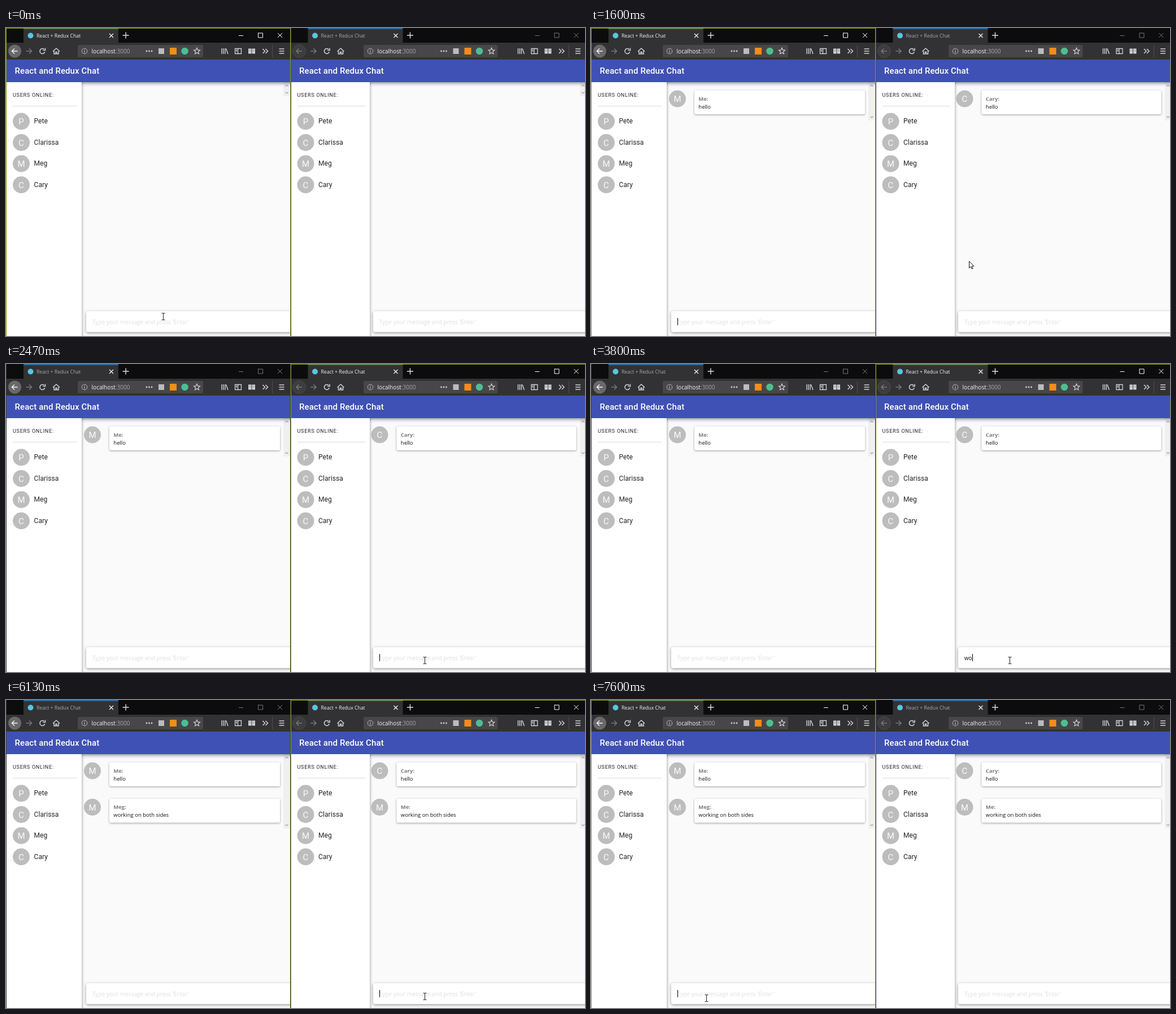
An HTML page with a canvas that plays this animation: 1025 px wide and 546 px high, repeating every 8000 ms.

```html
<!DOCTYPE html>
<html lang="en">
<head>
<meta charset="utf-8">
<title>React + Redux Chat</title>
<style>
html, body { margin: 0; width: 100%; height: 100%; overflow: hidden; background: #fafafa; }
canvas { display: block; width: 1025px; height: 546px; }
</style>
</head>
<body>
<canvas id="stage" width="1025" height="546"></canvas>
<script>
const ctx = document.getElementById('stage').getContext('2d');
const W = 1025, H = 546, LOOP = 8000;
const SANS = '"Open Sans", "Noto Sans", sans-serif';
const ROBOTO = 'Roboto, sans-serif';
const INPUT_FONT = '10.1px ' + SANS;
const PLACEHOLDER = "Type your message and press 'Enter'";
const USERS = ['Pete', 'Clarissa', 'Meg', 'Cary'];
const ACCENT = '#8f9f20', ICON = '#d2d2d4', DIM = '#77777a';

// Horizontal shifts of each group of controls, per window
const LEFT = { x: 0, right: 503, tab: 0, url: 0, act: 0, end: 0, side: 134, main: 0 };
const RIGHT = { x: 504, right: W, tab: 503.5, url: 506, act: 521.5, end: 524.5, side: 644, main: 508.5 };

// Times at which each further character appears
const LEFT_TYPING = { text: 'hello', keys: [[330, 1], [400, 2], [670, 5]], sent: 870 };
const RIGHT_TYPING = {
  text: 'working on both sides',
  keys: [[3730, 1], [3800, 2], [3870, 3], [3930, 4],
    ...Array.from({ length: 9 }, (_, i) => [4070 + i * 82.5, 5 + i]),
    [4870, 14], [4930, 15], [5070, 16], [5130, 17], [5270, 18], [5600, 19], [5670, 20], [5730, 21]],
  sent: 5870
};

const MOUSE = [[0, 278, 511], [1340, 278, 511], [1470, 480, 452], [1600, 669, 413], [1740, 684, 428],
  [1900, 702, 500], [2030, 716, 530], [2200, 735, 527], [2270, 741, 525], [6830, 741, 525],
  [6870, 645, 536], [6930, 590, 560], [7100, 300, 560], [7200, 252, 538], [7330, 204, 528], [LOOP, 204, 528]];

const within = (t, ...spans) => spans.some(([a, b]) => t >= a && t < b);

function rect(x, y, w, h, color) {
  ctx.fillStyle = color;
  ctx.fillRect(x, y, w, h);
}

function rounded(x, y, w, h, r, color) {
  ctx.fillStyle = color;
  ctx.beginPath();
  ctx.roundRect(x, y, w, h, r);
  ctx.fill();
}

function disc(x, y, r, color) {
  ctx.fillStyle = color;
  ctx.beginPath();
  ctx.arc(x, y, r, 0, Math.PI * 2);
  ctx.fill();
}

function ring(x, y, r, color, width = 1, from = 0, to = Math.PI * 2) {
  ctx.strokeStyle = color;
  ctx.lineWidth = width;
  ctx.beginPath();
  ctx.arc(x, y, r, from, to);
  ctx.stroke();
}

// Each path is a flat list of x, y pairs relative to (x, y)
function lines(x, y, color, width, ...paths) {
  ctx.strokeStyle = color;
  ctx.lineWidth = width;
  ctx.beginPath();
  for (const p of paths)
    for (let i = 0; i < p.length; i += 2)
      ctx[i ? 'lineTo' : 'moveTo'](x + p[i], y + p[i + 1]);
  ctx.stroke();
}

function label(str, x, y, font, color, spacing = 0, align = 'left') {
  ctx.font = font;
  ctx.fillStyle = color;
  ctx.textAlign = align;
  ctx.letterSpacing = spacing + 'px';
  ctx.fillText(str, x, y);
  ctx.letterSpacing = '0px';
}

function shadowed(blur, dy, alpha, draw) {
  ctx.save();
  ctx.shadowColor = `rgba(0,0,0,${alpha})`;
  ctx.shadowBlur = blur;
  ctx.shadowOffsetY = dy;
  draw();
  ctx.restore();
}

function avatar(x, y, name) {
  disc(x, y, 15, '#bdbdbd');
  label(name[0], x, y + 5.5, '15px ' + ROBOTO, '#fafafa', 0, 'center');
}

function star(x, y) {
  ctx.strokeStyle = ICON;
  ctx.lineWidth = 1.2;
  ctx.beginPath();
  for (let i = 0; i < 10; i++) {
    const a = -Math.PI / 2 + i * Math.PI / 5, r = i % 2 ? 2.7 : 5.8;
    ctx.lineTo(x + r * Math.cos(a), y + r * Math.sin(a));
  }
  ctx.closePath();
  ctx.stroke();
}

function tabStrip(w, focused) {
  rect(w.x, 0, w.right - w.x, 26, '#0c0c0d');
  rect(w.tab + 31, 0, 168, 26, '#323234');
  rect(w.tab + 31, 0, 168, 2, '#2d6da3');
  disc(w.tab + 43.5, 13.5, 5, '#5bc4de');
  label('React + Redux Chat', w.tab + 54, 17, '8.7px ' + SANS, focused ? '#f4f4f5' : '#a9a9ab');
  lines(w.tab + 186.5, 13.5, '#f0f0f0', 1.3, [-3.5, -3.5, 3.5, 3.5], [3.5, -3.5, -3.5, 3.5]);
  lines(w.tab + 212, 13, '#e0e0e0', 1.4, [-5.5, 0, 5.5, 0], [0, -5.5, 0, 5.5]);

  const button = focused ? '#ffffff' : DIM;
  lines(w.end + 416, 13.5, button, 1, [-4, 0, 4, 0]);
  lines(w.end + 450.5, 13, button, 1, [-4, -4, 4, -4, 4, 4, -4, 4, -4, -4.5]);
  lines(w.end + 485, 13, button, 1, [-4, -4, 4, 4], [4, -4, -4, 4]);
}

function toolbar(w) {
  rect(w.x, 26, w.right - w.x, 30, '#323234');
  const y = 41, canGoBack = w === LEFT;

  disc(w.tab + 15.5, y, 11.5, canGoBack ? '#69696b' : '#3d3d3f');
  if (!canGoBack) ring(w.tab + 15.5, y, 11.5, '#4a4a4c');
  lines(w.tab + 15.5, y, canGoBack ? '#f4f4f5' : DIM, 1.5, [5, 0, -5, 0], [-.5, -4.5, -5, 0, -.5, 4.5]);
  lines(w.tab + 40.5, y, DIM, 1.5, [-5, 0, 5, 0], [.5, -4.5, 5, 0, .5, 4.5]);
  ring(w.tab + 64.5, y, 4.5, ICON, 1.5, .3, 5.5);
  lines(w.tab + 64.5, y, ICON, 1.5, [5, -5.5, 5, -1.5, 1, -1.5]);
  lines(w.tab + 89, y, ICON, 1.5, [-6, .5, 0, -5, 6, .5], [-4, 0, -4, 5, -1, 5, -1, 1.5, 1, 1.5, 1, 5, 4, 5, 4, 0]);

  const fieldX = w.url + 127;
  rounded(fieldX, 30, w.act + 349 - fieldX, 22, 2, '#474749');
  ring(w.url + 139, y, 4.8, '#b5b5b7');
  rect(w.url + 138.4, 40, 1.2, 4, '#b5b5b7');
  rect(w.url + 138.4, 38, 1.2, 1.2, '#b5b5b7');
  label('localhost', w.url + 151.5, 45, INPUT_FONT, '#f4f4f5');
  const hostWidth = ctx.measureText('localhost').width;
  label(':3000', w.url + 151.5 + hostWidth, 45, INPUT_FONT, '#a5a5a8');
  for (const dx of [-4.5, 0, 4.5]) disc(w.act + 253.5 + dx, y, 1.4, ICON);
  rect(w.act + 270, 36, 10, 10, '#bcbcbe');
  rect(w.act + 290, 35, 12, 12, '#f98b17');
  disc(w.act + 316.5, y, 6.2, '#4fbd91');
  star(w.act + 338, y);

  lines(w.end + 387, y, ICON, 1.4, [-5, -5, -5, 5], [-2, -5, -2, 5], [1, -5, 1, 5], [2.5, -4.5, 6, 5]);
  lines(w.end + 411, y, ICON, 1.3, [-5.5, -4.5, 5.5, -4.5, 5.5, 4.5, -5.5, 4.5, -5.5, -5], [-.5, -4, -.5, 4],
    [-4, -2, -2, -2], [-4, 0, -2, 0]);
  rect(w.end + 429, 36.5, 5.5, 9, ICON);
  rect(w.end + 435.5, 36.5, 5.5, 9, ICON);
  lines(w.end + 435, y, '#77777a', .7, [-4.5, -2, -2, -2], [-4.5, 0, -2, 0], [2, -2, 4.5, -2], [2, 0, 4.5, 0]);
  lines(w.end + 459, y, ICON, 1.5, [-4.5, -4, -.5, 0, -4.5, 4], [.5, -4, 4.5, 0, .5, 4]);
  rect(Math.round(w.end + 471), 30, 1, 22, '#4f4f51');
  lines(w.end + 488, y, ICON, 1.4, [-4.5, -4, 4.5, -4], [-4.5, 0, 4.5, 0], [-4.5, 4, 4.5, 4]);
}

function sidebar(w) {
  ctx.save();
  ctx.beginPath();
  ctx.rect(w.x, 96, w.right - w.x, H);
  ctx.clip();
  shadowed(5, 1, .45, () => rect(w.x, 60, w.side - w.x, H, '#ffffff'));
  ctx.restore();
  label('USERS ONLINE:', w.tab + 12, 122, '9px ' + ROBOTO, '#222222', .75);
  rect(Math.round(w.tab + 12), 138, w.side - w.tab - 20.5, 1, '#dcdcdc');
  USERS.forEach((name, i) => {
    const y = 165.5 + i * 37.5;
    avatar(w.tab + 27, y, name);
    label(name, w.tab + 49.5, y + 3.5, '12px ' + ROBOTO, '#212121', .1);
  });
}

function message(w, i, from, author, text) {
  const y = 110.5 + i * 64.5, x = w.main + 183;
  avatar(w.main + 153, y + 15, from);
  shadowed(3.5, 1, .38, () => rounded(x, y, w.end + 485 - x, 42.5, 2.5, '#ffffff'));
  label(author + ':', w.main + 190.3, y + 18, 'bold 9.5px ' + SANS, '#7d7d7d');
  label(text, w.main + 190.3, y + 32, '9.5px ' + SANS, '#111111');
}

function scrollbar(w, count) {
  const bottom = [121, 164, 228][count], x = w.end + 497;
  rect(Math.round(w.end + 491), 96, 13, bottom - 96, '#f0f0f0');
  lines(x, 102, '#a3a3a3', 1.2, [-2.5, 1.5, 0, -1, 2.5, 1.5]);
  lines(x, bottom - 6, '#a3a3a3', 1.2, [-2.5, -1.5, 0, 1, 2.5, -1.5]);
}

function inputBox(w, typed, caret) {
  const x = Math.round(w.main + 141.7), textX = Math.floor(w.main + 153);
  shadowed(5, 1.5, .4, () => rounded(x, 502, 420, 37, 3, '#ffffff'));
  label(typed || PLACEHOLDER, textX - .3, 524.5, INPUT_FONT, typed ? '#111111' : '#dfdfdf');
  if (caret) rect(Math.round(textX + ctx.measureText(typed).width), 514, 1, 13, '#000000');
}

function browser(w, view) {
  ctx.save();
  ctx.beginPath();
  ctx.rect(w.x, 0, w.right - w.x, H);
  ctx.clip();
  rect(w.x, 56, w.right - w.x, H, '#fafafa');
  view.messages.forEach((m, i) => message(w, i, ...m));
  scrollbar(w, view.messages.length);
  inputBox(w, view.typed, view.caret);
  shadowed(6, 2, .45, () => rect(w.x - 10, 56, w.right - w.x + 20, 40, '#3f51b5'));
  sidebar(w);
  label('React and Redux Chat', w.tab + 15.5, 81, '500 15px ' + ROBOTO, '#ffffff', .11);
  tabStrip(w, view.focused);
  toolbar(w);
  ctx.restore();
}

function frameEdges(leftFocused) {
  const left = leftFocused ? ACCENT : '#3c3c3e';
  rect(0, 0, 1, H, left);
  rect(503, 0, 1, H, left);
  rect(504, 0, 1, H, leftFocused ? '#4a4a4c' : ACCENT);
  if (leftFocused) rect(0, 0, 504, 1, ACCENT);
  else rect(504, 0, W - 504, 1, ACCENT);
}

function typedAt(t, typing) {
  if (t >= typing.sent) return '';
  let n = 0;
  for (const [at, count] of typing.keys) if (t >= at) n = count;
  return typing.text.slice(0, n);
}

function mouseAt(t) {
  const i = MOUSE.findIndex(p => p[0] > t);
  const [t0, x0, y0] = MOUSE[i - 1], [t1, x1, y1] = MOUSE[i];
  const k = (t - t0) / (t1 - t0);
  return [Math.round(x0 + (x1 - x0) * k), Math.round(y0 + (y1 - y0) * k)];
}

function pointer(x, y) {
  const overInput = y >= 502 && y < 539 && (x >= 650 || (x >= 142 && x < 503));
  if (overInput) {
    const beam = [[-3, -6, -1, -6, 0, -5, 1, -6, 3, -6], [0, -5, 0, 5], [-3, 6, -1, 6, 0, 5, 1, 6, 3, 6]];
    lines(x + .5, y + .5, '#333333', 1.1, ...beam);
    return;
  }
  ctx.beginPath();
  [[0, 0], [0, 12], [2.8, 9.4], [4.6, 13.6], [6.4, 12.8], [4.6, 8.8], [8.3, 8.6]]
    .forEach(([dx, dy]) => ctx.lineTo(x + .5 + dx, y + .5 + dy));
  ctx.closePath();
  ctx.fillStyle = '#ffffff';
  ctx.fill();
  ctx.strokeStyle = '#111111';
  ctx.lineWidth = 1;
  ctx.stroke();
}

function render(t) {
  const leftFocused = !within(t, [2330, 7400]);
  const left = [], right = [];
  if (t >= 870) left.push([USERS[2], 'Me', 'hello']);
  if (t >= 1000) right.push([USERS[3], USERS[3], 'hello']);
  if (t >= 5870) right.push([USERS[2], 'Me', RIGHT_TYPING.text]);
  if (t >= 6000) left.push([USERS[2], USERS[2], RIGHT_TYPING.text]);

  browser(LEFT, {
    focused: leftFocused, messages: left, typed: typedAt(t, LEFT_TYPING),
    caret: within(t, [330, 670], [1130, 1670], [2200, 2330], [7530, LOOP])
  });
  browser(RIGHT, {
    focused: !leftFocused, messages: right, typed: typedAt(t, RIGHT_TYPING),
    caret: within(t, [2470, 3000], [3530, 6200], [6730, 7260])
  });
  frameEdges(leftFocused);
  pointer(...mouseAt(t));
}

const start = performance.now();
function tick() {
  const elapsed = performance.now() - start;
  render(elapsed % LOOP);
  requestAnimationFrame(tick);
}
tick();
</script>
</body>
</html>
```
